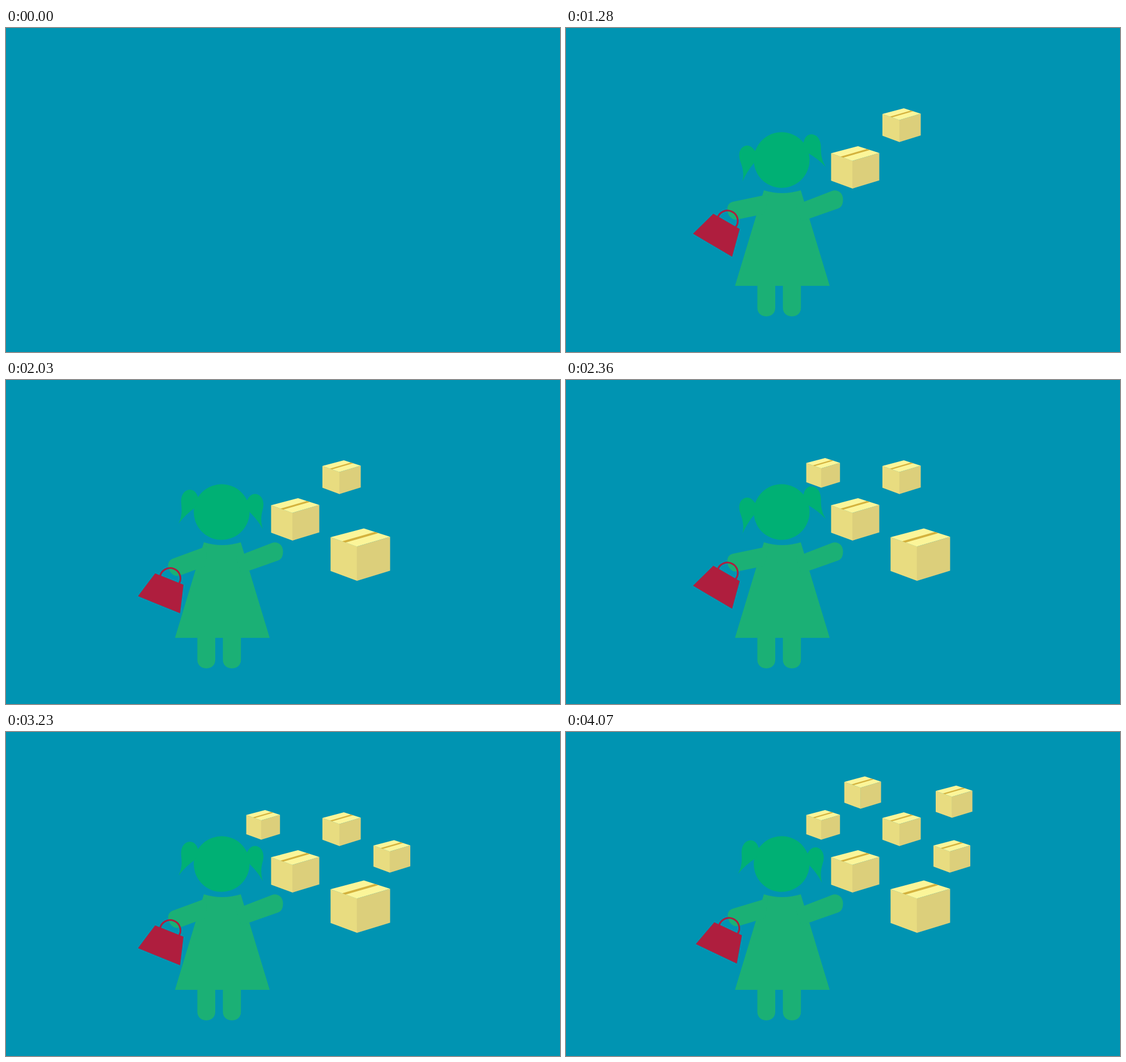
These frames come from a looping animation (977x573 px, 4100 ms). An HTML page:

```html
<!DOCTYPE html>
<html lang="en">
<head>
<meta charset="utf-8">
<title>Girl and parcels</title>
<style>
  html, body { margin: 0; width: 100%; height: 100%; overflow: hidden; background: #0094b2; }
  svg { display: block; width: 100%; height: 100%; }
  .body { fill: #1bb075; }
  .head { fill: #00b074; }
  .bag { fill: #af1e3e; }
  .handle { fill: none; stroke: #af1e3e; stroke-width: 3; }
</style>
</head>
<body>
<svg viewBox="0 0 977 573">
  <defs>
    <g id="parcel">
      <path fill="#e8dc80" d="M0 12.5 38 26V75L0 61Z"/>
      <path fill="#dccf7b" d="M85 12 37.5 26V75L85 60.5Z"/>
      <path fill="#fbf599" d="M0 12.5 47.5 0 85 12 37.5 26Z"/>
      <path fill="#d4b23e" d="M16.5 18.4 63 5 68.5 6.7 21.5 20.2Z"/>
    </g>
    <path id="tail" d="M40 -20 44 -25C48 -35 56 -37.5 62 -35C70 -32 73.5 -23 72.5 -13C71.5 -4 67.5 8 74.5 25.5Q64 9 47 -5Z"/>
  </defs>

  <g id="girl" visibility="hidden">
    <g class="body">
      <path d="M349 287Q381 297 414 287L465 456H298Z"/>
      <path d="M337.5 455H369V495C369 515 337.5 515 337.5 495Z"/>
      <path d="M382.5 455H414.3V495C414.3 515 382.5 515 382.5 495Z"/>
      <path d="M405 313 467 289C478 284 488.5 291 488.5 303C488.5 312 486 317 479 319.500L415 342Z"/>
    </g>
    <g id="arm">
      <path class="body" d="M355 293.500 294 316C288 318.500 285.500 323 286 329C287 340 296 349 306 346L352 329Z"/>
      <path class="bag" d="M263 342 313 362 307 412.500 232.800 382.300Z"/>
      <path class="handle" d="M271.700 347A18.200 18.200 0 1 1 305.500 359.500"/>
    </g>
    <g class="head" transform="translate(380.300 233.500)">
      <g id="head">
        <circle r="49.200"/>
        <use href="#tail"/>
        <use href="#tail" transform="scale(-1 1)"/>
      </g>
    </g>
  </g>
  <g id="parcels"></g>
</svg>

<script>
const LOOP = 4100, START = 500, STEP = 30;
const FIRST_PARCEL = 620, PARCEL_GAP = 540;

// left, top, width in order of appearance
const spots = [
  [467.5, 209, 85], [558, 142, 67.6], [572.4, 262.5, 105], [423.7, 138, 59.5],
  [648, 191.3, 65], [652, 94.7, 64.7], [490.8, 78.6, 64.8]
];

const byId = id => document.getElementById(id);
const girl = byId('girl'), arm = byId('arm'), head = byId('head');

const parcels = spots.map(([x, y, width]) => {
  const use = document.createElementNS('http://www.w3.org/2000/svg', 'use');
  use.setAttribute('href', '#parcel');
  use.setAttribute('transform', `translate(${x} ${y}) scale(${width / 85})`);
  return byId('parcels').appendChild(use);
});

const show = (node, on) => node.setAttribute('visibility', on ? 'visible' : 'hidden');

// Linear swing 0 -> 1 -> 0, with each leg lasting `half` ms
function swing(t, half) {
  const p = ((t - 620) / half + 2) % 2;
  return 1 - Math.abs(1 - p);
}

function draw(time) {
  const t = START + Math.floor((time - START) / STEP) * STEP;
  show(girl, time >= START);
  parcels.forEach((p, i) => show(p, t >= FIRST_PARCEL + i * PARCEL_GAP));
  arm.setAttribute('transform', `rotate(${11.9 - 17 * swing(t, 300)} 353 314)`);
  head.setAttribute('transform', `rotate(${12.5 - 25 * swing(t, 600)})`);
}

const origin = performance.now();
function tick() {
  draw((performance.now() - origin) % LOOP);
  requestAnimationFrame(tick);
}
tick();
</script>
</body>
</html>
```
